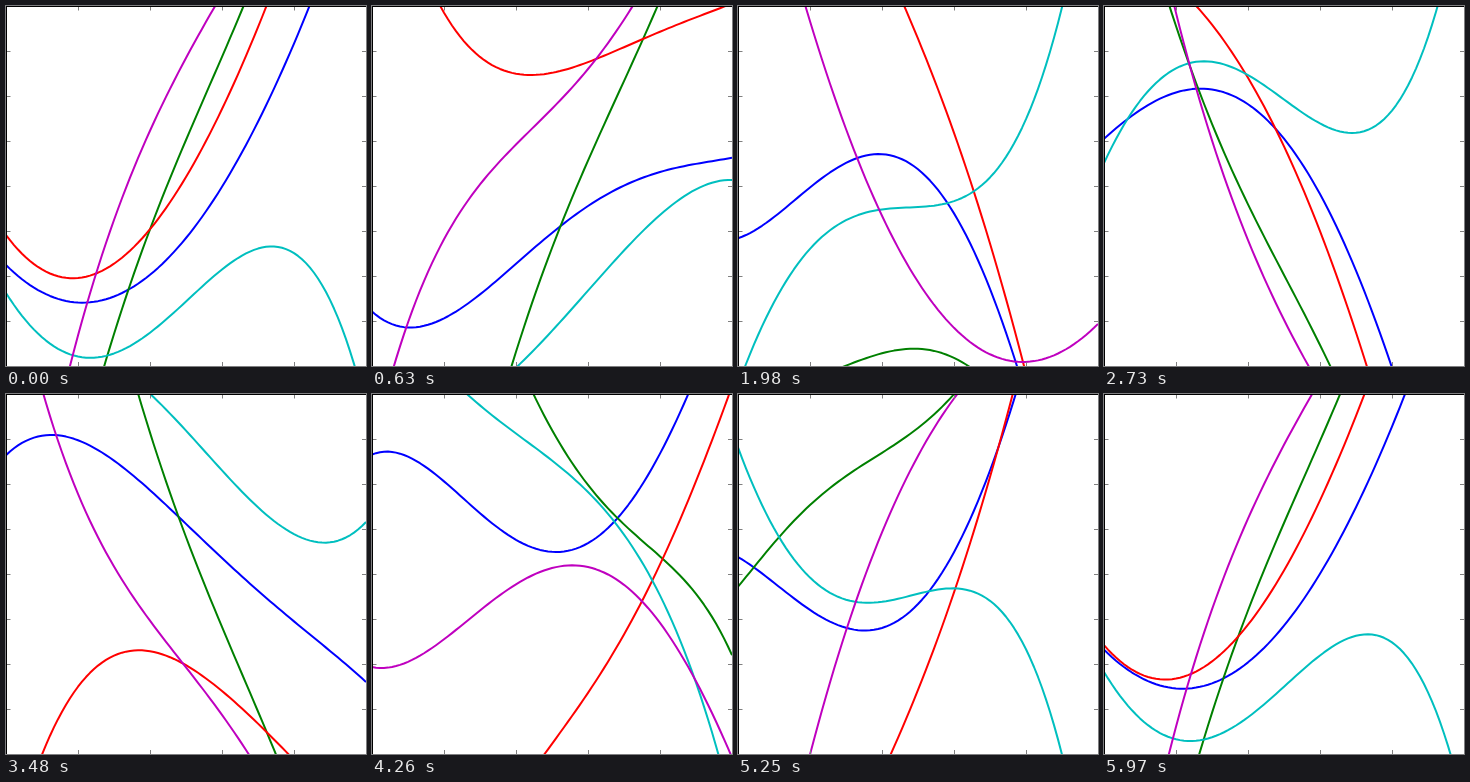
Recreate the animation shown at these times as an HTML page. Size 360 by 360 pixels, loop 6000 ms.

```html
<!DOCTYPE html>
<html lang="en">
<head>
<meta charset="utf-8">
<title>Drifting random curves</title>
<style>
  html, body { margin: 0; width: 100%; height: 100%; overflow: hidden; background: #fff; }
  svg { display: block; width: 360px; height: 360px; }
  .curves path { fill: none; stroke-width: 2; stroke-linejoin: round; }
  .axes { fill: none; stroke: #000; stroke-width: 1; }
  .ticks { fill: none; stroke: #808080; stroke-width: 1; }
</style>
</head>
<body>
<svg viewBox="0 0 360 360">
  <g class="curves"></g>
  <path class="ticks"/>
  <path class="axes" d="M0 .5H360M.5 0V360"/>
</svg>
<script>
const SIZE = 360, MID = SIZE / 2, STEP = 4;
const LOOP = 6000, TICK = 30;

// Polynomial in u, lowest power first; u runs from -1 to 1 across the stage.
const poly = (...k) => u => k.reduceRight((sum, c) => sum * u + c, 0);

// Each curve circles between two shapes: a(u) cos(angle) + b(u) sin(angle).
const curves = [
  { color: '#0000ff',
    a: poly(-52, 220.5, 180.5, -13),
    b: poly(-9.5, -44, -318, -98, 82.5) },
  { color: '#008000',
    a: poly(46, 423, -76, 207, -3.5, -71.5),
    b: poly(-160.5, 224, -238.5, -1.5, 86.5, 39) },
  { color: '#ff0000',
    a: poly(9, 302, 196, -39.5, 8.5),
    b: poly(173, -333, -54.5, -177.5, 76) },
  { color: '#00bfbf',
    a: poly(-115.5, 167, 13, -224.5, -62),
    b: poly(-87.5, 103, 54, 188, 38.5) },
  { color: '#bf00bf',
    a: poly(128, 336, -109.5, 134, -58.5),
    b: poly(-39, -134.5, 227, 60.5, -35) }
];

const group = document.querySelector('.curves');
for (const curve of curves) {
  curve.path = document.createElementNS('http://www.w3.org/2000/svg', 'path');
  curve.path.setAttribute('stroke', curve.color);
  group.append(curve.path);
}

let marks = '';
for (let x = 72; x < SIZE; x += 72) marks += `M${x + .5} 0v4.5M${x + .5} 360v-4`;
for (let y = 45; y < SIZE; y += 45) marks += `M0 ${y + .5}h4.5M360 ${y + .5}h-4`;
document.querySelector('.ticks').setAttribute('d', marks);

function outline({ a, b }, angle) {
  const c = Math.cos(angle), s = Math.sin(angle);
  const points = [];
  for (let x = 0; x <= SIZE; x += STEP) {
    const u = x / MID - 1;
    points.push(`${x} ${(MID - a(u) * c - b(u) * s).toFixed(2)}`);
  }
  return 'M' + points.join('L');
}

function draw(time) {
  const t = Math.floor((time % LOOP) / TICK) * TICK;
  const angle = 2 * Math.PI * t / LOOP;
  for (const curve of curves) curve.path.setAttribute('d', outline(curve, angle));
}

const start = performance.now();
function loop() {
  draw(performance.now() - start);
  requestAnimationFrame(loop);
}
loop();
</script>
</body>
</html>
```
